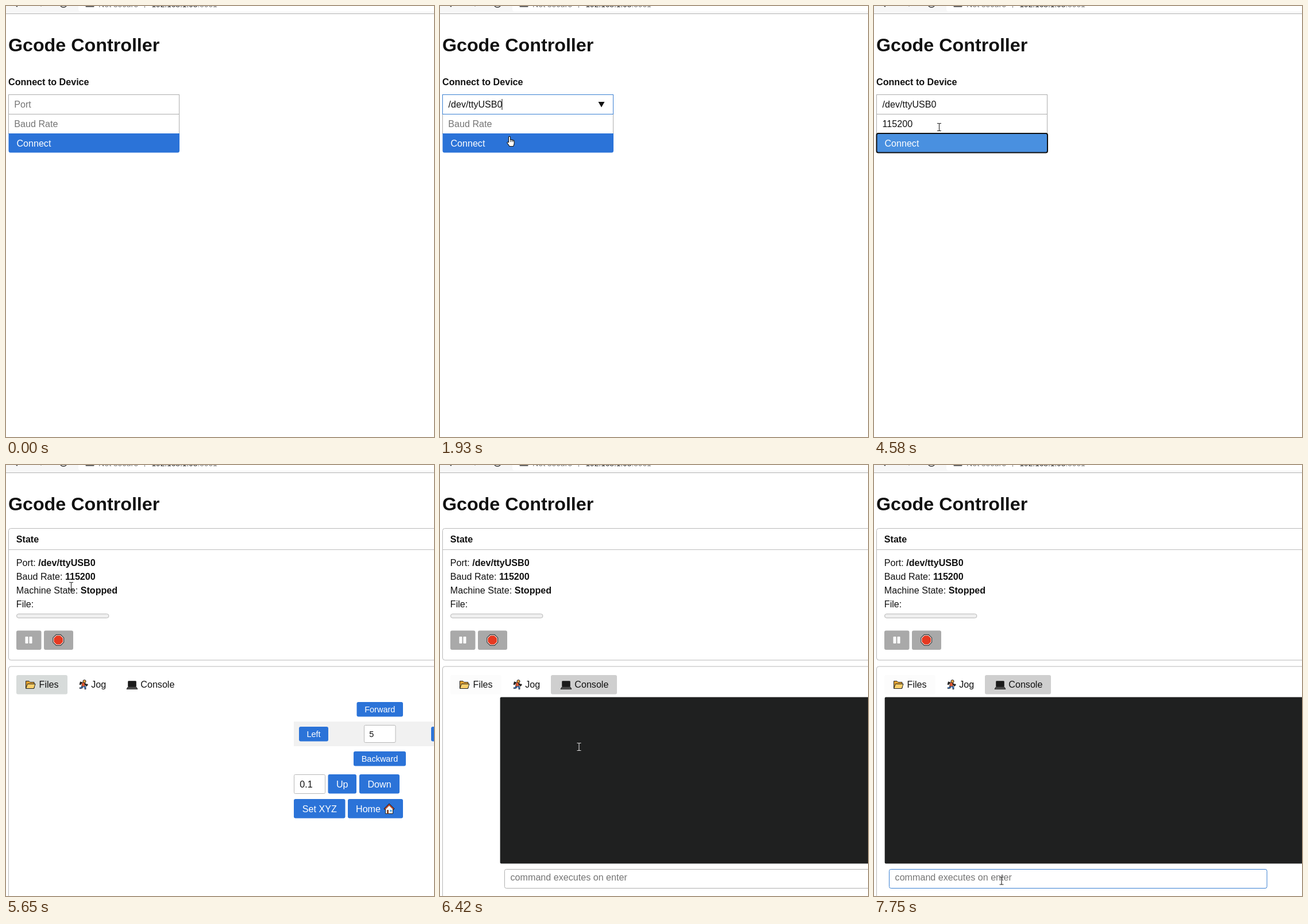
An HTML page that plays this animation: 745 by 751 pixels, repeating every 8000 ms.

```html
<!DOCTYPE html>
<html>
<head>
<meta charset="utf-8">
<style>
  html, body { margin: 0; width: 100%; height: 100%; overflow: hidden; background: #fff; }
  svg { display: block; font: 16.13px "Liberation Sans", Arial, sans-serif; }
</style>
</head>
<body>
<svg id="stage" width="745" height="751" viewBox="0 0 745 751"></svg>
<script>
const LOOP = 8000, BLUE = '#2b73d8', FOCUS = '#3a80d2', INK = '#111', HINT = '#757575';
const stage = document.getElementById('stage');

// Bursts of screen updates: [first, last, count]
const bursts = [[0, 0, 1], [210, 1000, 11], [1070, 1860, 11], [1930, 2560, 9], [2950, 3080, 2],
  [3310, 3310, 1], [3560, 3560, 1], [3790, 3790, 1], [3940, 3940, 1], [4110, 4110, 1],
  [4260, 4580, 5], [4810, 4810, 1], [5650, 6420, 11], [6500, 6830, 5], [7050, 7360, 5], [7750, 7750, 1]];
const keyTimes = [3080, 3310, 3560, 3790, 3940, 4110];

// Pointer hotspot: [time, x, y]
const path = [[210, 680, 731], [1000, 133, 172], [1230, 133, 172], [1700, 123, 233], [1860, 121, 227],
  [1930, 121, 227], [2402, 113.5, 211], [5650, 113.5, 211], [6266, 238.5, 380], [6420, 242, 491],
  [6830, 222, 716], [7050, 222, 716], [7280, 222, 724.5]];

function updateTime(t) {
  const [a, b, n] = bursts.filter(r => r[0] <= t).pop();
  const step = n > 1 ? (b - a) / (n - 1) : 1;
  return a + Math.min(n - 1, Math.floor((t - a) / step + 0.01)) * step;
}

function pointerAt(t) {
  const i = path.findIndex(p => p[0] > t);
  if (i < 0) return path[path.length - 1].slice(1);
  const [a, b] = [path[i - 1], path[i]];
  const p = (t - a[0]) / (b[0] - a[0]), e = p * p * (3 - 2 * p);
  return [a[1] + (b[1] - a[1]) * e, a[2] + (b[2] - a[2]) * e];
}

const text = (x, y, s, fill = INK, more = '') => `<text x="${x}" y="${y}" fill="${fill}" ${more}>${s}</text>`;
const rect = (x, y, w, h, fill, r = 0, more = '') =>
  `<rect x="${x}" y="${y}" width="${w}" height="${h}" fill="${fill}" rx="${r}" ${more}/>`;
const shape = (d, fill, more = '') => `<path d="${d}" fill="${fill}" ${more}/>`;
const field = (x, y, w, h, color, r = 0) => rect(x, y, w, h, '#fff', r, `stroke="${color}"`);
const caret = (x, y) => rect(x, y, 1, 19, INK);
const bold = 'font-weight="bold"';
const button = (x, y, w, h, label, size = 16.13) => rect(x, y, w, h, BLUE, 3) +
  text(x + w / 2, y + h / 2 + size * 0.36, label, '#fff', `text-anchor="middle" font-size="${size}"`);
const octagon = (r, fill) => {
  const pts = [...Array(8)].map((_, i) => {
    const a = (i + 0.5) * Math.PI / 4;
    return [91.2 + r * Math.cos(a), 305 + r * Math.sin(a)];
  });
  return `<polygon points="${pts}" fill="${fill}"/>`;
};

function header() {
  return rect(0, 0, 745, 13, '#f7f7f7') + shape('M126 0H745V9.5H130Q126 9.5 126 5Z', '#fff') +
    rect(0, 13, 745, 1, '#b4b4b4') +
    shape('M16 -2L19 1L20 0', 'none', 'stroke="#444" stroke-width="1.3"') + rect(60, 0, 2, 1, '#bbb') +
    '<circle cx="100" cy="-4" r="6.3" fill="none" stroke="#333" stroke-width="1.4"/>' +
    rect(138.5, -4, 15, 6, '#666', 1) +
    text(161, 1.5, 'Not secure', '#777', 'font-size="14.3"') + rect(241, -9, 1, 12, '#888') +
    text(253.5, 1.5, '192.168.1.98<tspan fill="#777">:5001</tspan>', '#222', 'font-size="13.7"') +
    text(3.9, 78.5, 'Gcode Controller', INK, bold + ' font-size="32.26"');
}

function connectPage(t, x, y) {
  const popup = t >= 1220 && t < 1850, chosen = t >= 1850;
  const portFocus = t >= 1140 && t < 2470, baudFocus = t >= 2470 && t < 4260;
  const overPort = t >= 210 && x < 302 && y > 154 && y < 188;
  const baud = '115200'.slice(0, keyTimes.filter(k => k <= t + 1).length);
  const port = field(4.5, 154.5, 297, 34, portFocus ? FOCUS : '#adadad');
  const rate = field(4.5, 188.5, 297, 34, baudFocus ? FOCUS : '#adadad');
  let s = text(4, 138.3, 'Connect to Device', INK, bold) + (portFocus ? rate + port : port + rate);
  s += chosen ? text(14.5, 177.3, '/dev/ttyUSB0') : text(14.3, 177.3, 'Port', HINT);
  s += baud ? text(14.6, 211, baud) : text(14.3, 211, 'Baud Rate', HINT);
  if (portFocus || overPort) s += shape('M275.5 167H286.5L281 176.5Z', INK);
  if (portFocus && (chosen || t < 1640)) s += caret(chosen ? 107.5 : 15, 162);
  if (baudFocus && (t < 2940 || baud)) s += caret(14.8 + baud.length * 8.95, 196);

  const p = Math.max(0, Math.min(1, (t - 4260) / 300));
  const mix = (a, b) => Math.round(a + (b - a) * p);
  const fill = `rgb(${mix(43, 73)},${mix(115, 144)},${mix(216, 224)})`;
  s += shape('M4.5 222H302V252Q302 255.5 298.5 255.5H8Q4.5 255.5 4.5 252Z', fill);
  if (t >= 4260) s += rect(4.5, 222, 297.5, 33.5, 'none', 3, 'stroke="#101010" stroke-width="2"');
  s += text(18.4, 244.5, 'Connect', '#fff');
  if (popup) {
    s += rect(2.5, 190.5, 301, 69, '#fff', 4, 'stroke="#c8c8c8"');
    if (y > 195) s += rect(3, 202, 300, 46, '#ececec');
    s += text(14.5, 230.5, '/dev/ttyUSB0');
  }
  return s;
}

function statePanel() {
  const row = (y, label, value = '') => text(17.8, y, `${label}: <tspan ${bold}>${value}</tspan>`);
  return rect(4.5, 110.5, 800, 229.5, '#fff', 4, 'stroke="#b8b8b8"') + rect(5, 147, 740, 1, '#bdbdbd') +
    text(17.8, 134.5, 'State', INK, bold) +
    row(175.7, 'Port', '/dev/ttyUSB0') + row(199.8, 'Baud Rate', '115200') +
    row(224, 'Machine State', 'Stopped') + row(248.2, 'File') +
    rect(18.5, 259.5, 160.5, 7, '#efefef', 3.5, 'stroke="#b9b9b9"') +
    rect(18, 288.5, 43.5, 33.5, '#a9a9a9', 3) + rect(66, 288.5, 51, 33.5, '#a9a9a9', 3) +
    rect(33.5, 299, 5, 12, '#fff', 1) + rect(40.5, 299, 5, 12, '#fff', 1) +
    octagon(10.6, '#111') + octagon(9.6, '#fff') + octagon(8.5, '#e63a22');
}

function tabs(t) {
  const opened = t >= 6300;
  const consoleFill = opened ? '#cfcfcf' : t >= 6230 ? '#dedede' : '#fff';
  return rect(4.5, 351, 800, 500, '#fff', 4, 'stroke="#b8b8b8"') +
    rect(18, 366, 89, 33.5, opened ? '#fcfcfc' : '#d7dbda', 3) + rect(193, 366, 115, 33.5, consoleFill, 3) +
    shape('M34.5 389V376.5H40L42 378.5H49V389Z', '#e0a030', 'stroke="#222"') +
    shape('M34.5 389.5L37.5 381.5H51L48.5 389.5Z', '#fbcf6c', 'stroke="#222"') +
    text(57.6, 388, 'Files') +
    shape('M133 380L130 379L129 383M136 380L140 384L142 382M134 385L138 387L138 391M133 385L132 388L128 389',
      'none', 'stroke="#222" stroke-width="2.8"') +
    shape('M132 379H137L137 386H132Z', '#e4572e', 'stroke="#222" stroke-width=".7"') +
    shape('M133 386L138 387L138 390M132 387L129 389', 'none', 'stroke="#3a78c8" stroke-width="1.6"') +
    '<circle cx="136.5" cy="377" r="2.6" fill="#f4a340" stroke="#222"/>' +
    text(148.2, 388, 'Jog') +
    rect(212.5, 376.5, 14, 10, '#1a1a1a', 1, 'stroke="#444"') +
    shape('M212 387H227L229 390.5H210Z', '#555', 'stroke="#111" stroke-width=".8"') +
    text(234.3, 388, 'Console');
}

function jogPanel() {
  return button(610.5, 413, 80.5, 25.5, 'Forward', 14.5) + rect(501, 447, 244, 43, '#f1f1f1') +
    button(510, 456, 51, 25.5, 'Left', 14.5) + button(740, 456, 60, 25.5, '', 14.5) +
    field(623.5, 453.5, 54.5, 30, '#b8b8b8', 2) + text(632.3, 473.8, '5', INK, 'font-size="14.5"') +
    button(605, 499, 91, 25.5, 'Backward', 14.5) +
    field(501.5, 539.5, 54, 33, '#b8b8b8', 2) + text(511.3, 561.5, '0.1') +
    button(560.5, 539, 49.5, 33.5, 'Up') + button(615, 539, 70, 33.5, 'Down') +
    button(501, 582, 89.5, 33.5, 'Set XYZ') + button(595, 582, 96, 33.5, '') +
    text(609, 604.6, 'Home', '#fff') +
    shape('M660.5 599V607.5H673.5V599L667 593Z', '#f5f5f5', 'stroke="#222"') +
    shape('M658.5 600L667 591.5L675.5 600', 'none', 'stroke="#222" stroke-width="3"') +
    shape('M659.5 599.5L667 592L674.5 599.5', 'none', 'stroke="#e8502e" stroke-width="1.5"') +
    rect(663, 601, 3, 6.5, '#8a4b2a') + rect(668.5, 601, 3, 3, '#4aa3df');
}

function consolePanel(t) {
  const left = Math.max(0, 1 - (t - 6270) / 400);
  const focus = t >= 7260;
  return `<g transform="translate(${300 * left ** 2.66} 0)">` +
    rect(18.7, 404.5, 1265, 290, '#1f2020', 2) + field(26.5, 704.5, 657.5, 33, focus ? FOCUS : '#b0b0b0', 3) +
    text(36.6, 723.5, 'command executes on enter', HINT) +
    (focus && t < 7740 ? caret(37, 709) : '') + '</g>';
}

const cursors = {
  arrow: shape('M0 0V16L3.8 12.5L6.2 18L8.8 17L6.4 11.6H11.5Z', '#fff', 'stroke="#111"'),
  hand: shape('M-1.5 10.5V1.2Q0 -.8 1.5 1.2V6Q3.2 5 4 6.5Q5.6 5.8 6.2 7.2Q8.2 6.6 8.2 9V12Q8 15 6.5 17.5H0' +
    'Q-1.5 15 -4.2 11.5Q-3.5 9 -1.5 10.5Z', '#fff', 'stroke="#111" stroke-width="1.1"') +
    shape('M1.5 6V10M4 7V10M6.2 7.5V10', 'none', 'stroke="#111" stroke-width=".8"')
};
const beam = color => shape('M-3.5 -6.5H-1Q0 -6.5 0 -5.5Q0 -6.5 1 -6.5H3.5M0 -6V6M-3.5 6.5H-1Q0 6.5 0 5.5Q0 6.5 1 6.5H3.5',
  'none', `stroke="${color}" stroke-width="1.1"`);

function pointer(t, x, y) {
  let look = cursors.arrow;
  if (t < 4800) {
    const popup = t >= 1220 && t < 1850 && y > 189;
    if (x < 302 && y > 154 && y < 256 && !popup) look = y < 222 ? beam('#222') : cursors.hand;
  } else if (t < 6300) {
    if (y < 225) look = beam('#222');
    else if (x > 193 && y > 366) look = cursors.hand;
  } else look = y < 404 ? cursors.hand : beam(y < 694 ? '#ddd' : '#222');
  return `<g transform="translate(${x} ${y})">${look}</g>`;
}

function draw(t) {
  const shown = t >= 210, [x, y] = shown ? pointerAt(t) : [0, 0];
  const page = t < 4800 ? connectPage(t, x, y)
    : statePanel() + tabs(t) + (t < 6300 ? jogPanel() : consolePanel(t));
  stage.innerHTML = header() + page + (shown ? pointer(t, x, y) : '');
}

let last = -1;
function tick() {
  const t = updateTime(performance.now() % LOOP);
  if (t !== last) draw(last = t);
  requestAnimationFrame(tick);
}
tick();
</script>
</body>
</html>
```
